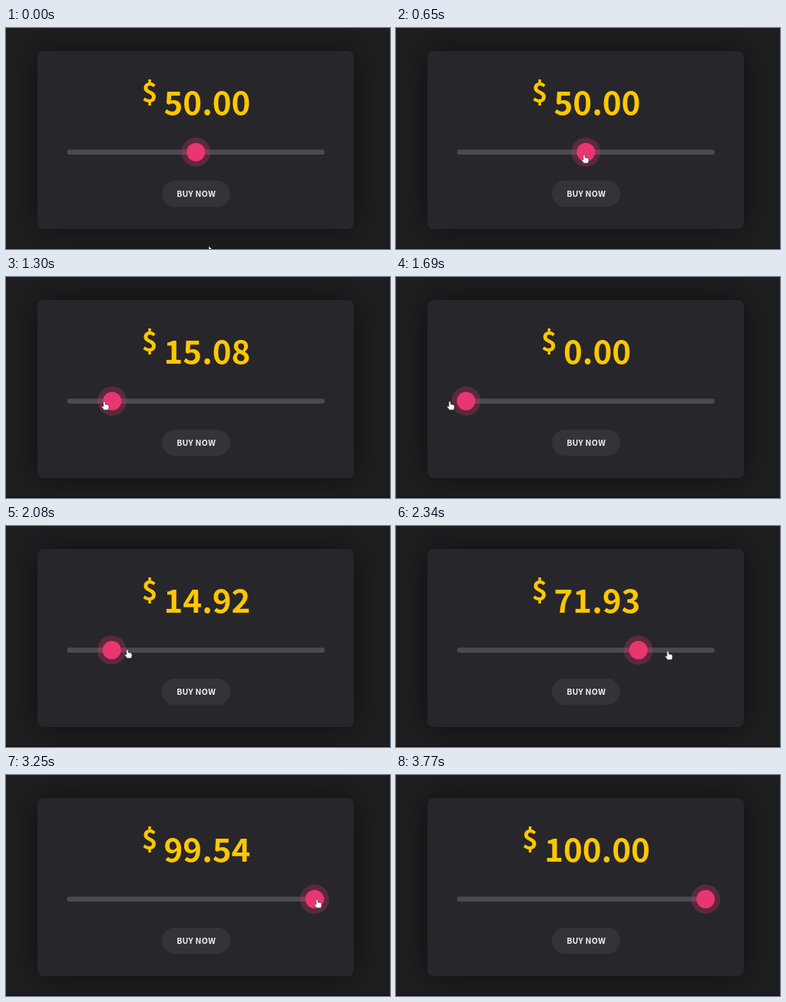
An HTML page that plays this animation: 500 by 288 pixels, repeating every 4420 ms.

```html
<!DOCTYPE html>
<html lang="en">
<head>
<meta charset="utf-8">
<title>Price slider</title>
<style>
  html, body { margin: 0; width: 100%; height: 100%; overflow: hidden; background: #1f1f21; }
  .stage { position: relative; width: 500px; height: 288px; overflow: hidden; }
  .card {
    position: absolute; left: 41px; top: 30px; width: 412px; height: 232px;
    border-radius: 8px; background: #27262b; box-shadow: 0 0 46px rgba(0, 0, 0, .55);
  }
  svg { position: absolute; left: 0; top: 0; }
  text { font-family: "Noto Sans CJK JP", "Noto Sans CJK SC", "Noto Sans", sans-serif; font-weight: 700; text-anchor: middle; }
  .price { font-size: 42px; fill: #ffc700; }
  .sign { font-size: 35px; }
  .label { font-size: 10.5px; letter-spacing: .3px; fill: #f4f2f5; }
</style>
</head>
<body>
<div class="stage">
  <div class="card"></div>
  <svg width="500" height="288" viewBox="0 0 500 288">
    <rect y="286" width="500" height="2" fill="#19151b"/>
    <text class="price" x="247.5" y="113"><tspan class="sign" dy="-16">$</tspan><tspan id="amount" dx="8.3" dy="16">50.00</tspan></text>
    <rect x="79.5" y="158.5" width="335.5" height="6.5" rx="3.25" fill="#4b4a51"/>
    <g id="thumb">
      <circle r="19" fill="#e8336e" fill-opacity=".27"/>
      <circle r="12" fill="#ea3670"/>
    </g>
    <rect x="203" y="199" width="89" height="34" rx="17" fill="#343338"/>
    <text class="label" x="247.6" y="220">BUY NOW</text>
    <g id="cursor" fill="#fff" stroke="#222" stroke-width=".6">
      <path id="arrow" d="M0 0V11.5L2.7 9L4.5 13L6.3 12.2L4.6 8.3H8.2Z"/>
      <path id="hand" d="M-1.2 .6Q0 -.6 1.2 .6V4Q5.7 3.8 6 6V8Q5.8 10 5 11.2H-.5Q-2 9 -3.7 7Q-3.3 5.5 -1.2 7Z"/>
    </g>
  </svg>
</div>
<script>
const STEP = 130, LOOP = 4420, LAST = 29;
const $ = id => document.getElementById(id);

const linear = u => u;
const smooth = u => u * u * (3 - 2 * u);
const speedUp = u => u ** 1.5;
const slowDown = u => 1 - (1 - u) ** 1.6;

// Keys: [step, value, easing towards it]
const price = [
  [0, 50], [5, 50], [10, 15.08, speedUp], [12, 0, slowDown], [15, 0],
  [16, 14.92], [20, 100, slowDown], [21, 100], [22, 67.08],
  [25, 99.54, smooth], [26, 100]
];
const pointerX = [
  [0, 264], [5, 245, smooth], [10, 128, speedUp], [12, 71, slowDown], [14, 69],
  [15, 92], [16, 158], [20, 450, slowDown], [21, 450], [22, 298],
  [25, 405, smooth], [27, 430, slowDown]
];
const pointerY = [
  [0, 284], [5, 165, smooth], [10, 162], [16, 161], [20, 164], [22, 164], [25, 162], [27, 164]
];

function at(keys, n) {
  const i = keys.findIndex(k => k[0] >= n);
  if (i < 0) return keys[keys.length - 1][1];
  if (i === 0) return keys[0][1];
  const [n0, a] = keys[i - 1], [n1, b, ease = linear] = keys[i];
  return a + (b - a) * ease((n - n0) / (n1 - n0));
}

const show = (el, on) => el.setAttribute("visibility", on ? "visible" : "hidden");
const move = (el, x, y) => el.setAttribute("transform", `translate(${x} ${y})`);

function draw(now) {
  const n = Math.min(LAST, Math.floor(now % LOOP / STEP));
  const value = at(price, n);
  const x = Math.round(at(pointerX, n)), y = Math.round(at(pointerY, n));
  const overButton = x > 203 && x < 292 && y > 199 && y < 233;
  const dragging = n >= 4 && n <= 26;
  const hand = dragging || overButton;
  $("amount").textContent = value.toFixed(2);
  move($("thumb"), 91.2 + value * 3.12, 161.8);
  move($("cursor"), x, y);
  show($("hand"), hand && n < LAST);
  show($("arrow"), !hand && n < LAST);
}

const start = performance.now();
function tick() {
  draw(performance.now() - start);
  requestAnimationFrame(tick);
}
tick();
</script>
</body>
</html>
```
